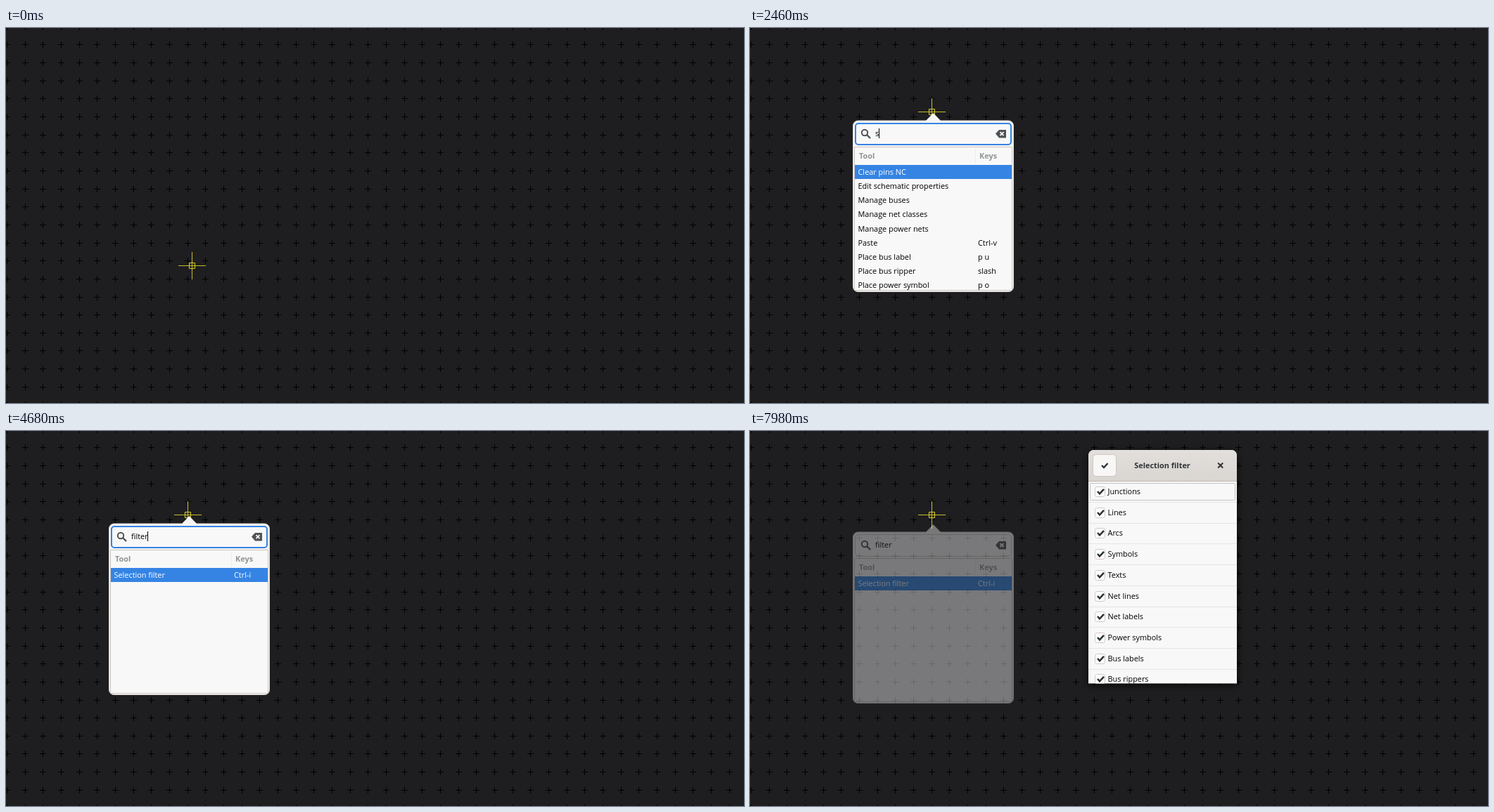
Recreate the animation shown at these times as an HTML page with a canvas. Size 1049x534 px, loop 8 s.

```html
<!DOCTYPE html>
<html lang="en">
<head>
<meta charset="utf-8">
<title>Tool search</title>
<style>
html, body { margin: 0; width: 100%; height: 100%; overflow: hidden; background: #1e1e20; }
canvas { position: absolute; left: 0; top: 0; }
</style>
</head>
<body>
<canvas id="stage" width="1049" height="534"></canvas>
<canvas id="popover" width="1049" height="534"></canvas>
<script>
const LOOP = 8000, TICK = 30;
const BLUE = '#3584e4', PAPER = '#f8f8f8', EDGE = '#cdc7c2', INK = '#000', ICON = '#505355';
const stage = document.getElementById('stage').getContext('2d');
const popCanvas = document.getElementById('popover');
const pop = popCanvas.getContext('2d');

// Rows are "name|keys"
const allTools = ['Annotate', 'BOM export window', 'Clear pins NC', 'Draw arc|d a', 'Draw line|d l',
  'Draw line rectangle|d L', 'Draw net line|n', 'Edit schematic properties', 'Enter datum|Return'];
const sTools = ['Clear pins NC', 'Edit schematic properties', 'Manage buses', 'Manage net classes',
  'Manage power nets', 'Paste|Ctrl-v', 'Place bus label|p u', 'Place bus ripper|slash', 'Place power symbol|p o'];
const fTools = ['Export PDF', 'PDF export window', 'Preferences|Ctrl-P', 'Selection filter|Ctrl-i',
  'Selection qualifier auto|S a', 'Selection qualifier include box|S i',
  'Selection qualifier include origin|S o', 'Selection qualifier touch box|S t'];
const fiTools = fTools.slice(3), filTools = fTools.slice(3, 4);

// Text and distance of its end from the page's right edge
const wideRows = [['Select more', 190], ['Place selected symbols on the board', 21],
  ['Rotate selected symbols', 27], ['Select nets', 190], ['Move to other schematic', 18],
  ['Assign to Group resp. Tag', 4], ['Set group', 190], ['Highlight net connection', 25]];

const typing = [[0, ' ', allTools], [2460, 's', sTools], [3610, '', sTools], [3768, 'f', fTools],
  [4050, 'fi', fiTools], [4200, 'fil', filTools], [4260, 'filt', filTools],
  [4530, 'filte', filTools], [4680, 'filter', filTools]];
const caretOff = [[3210, 3630], [5820, 6210], [6990, LOOP]];
const filters = ['Junctions', 'Lines', 'Arcs', 'Symbols', 'Texts', 'Net lines', 'Net labels',
  'Power symbols', 'Bus labels', 'Bus rippers'];

const unit = (t, start, length) => Math.min(1, Math.max(0, (t - start) / length));
const easeOut = u => 1 - (1 - u) ** 3;

function text(c, s, x, y, color = INK, bold = false, align = 'left') {
  c.font = (bold ? 'bold ' : '') + '10.9px "Open Sans", "Noto Sans", sans-serif';
  c.fillStyle = color;
  c.textAlign = align;
  c.fillText(s, x, y);
}

function rect(c, x, y, w, h, color) {
  c.fillStyle = color;
  c.fillRect(x, y, w, h);
}

function box(c, x, y, w, h, r, fill, stroke, line = 1) {
  c.beginPath();
  c.roundRect(x, y, w, h, r);
  if (fill) { c.fillStyle = fill; c.fill(); }
  if (stroke) { c.strokeStyle = stroke; c.lineWidth = line; c.stroke(); }
}

function path(c, points, color, line) {
  c.beginPath();
  points.forEach(([x, y]) => c.lineTo(x, y));
  c.strokeStyle = c.fillStyle = color;
  c.lineWidth = line;
  if (line) c.stroke(); else c.fill();
}

function cross(c, x, y, r, color, line) {
  path(c, [[x - r, y - r], [x + r, y + r]], color, line);
  path(c, [[x + r, y - r], [x - r, y + r]], color, line);
}

function clip(c, x, y, w, h, draw) {
  c.save();
  c.beginPath();
  c.rect(x, y, w, h);
  c.clip();
  draw();
  c.restore();
}

function drawGrid() {
  rect(stage, 0, 0, 1049, 534, '#1e1e20');
  for (let i = 0; i < 41; i++) {
    for (let j = 0; j < 22; j++) {
      const x = Math.round(1 + 25.67 * i), y = Math.round(-2.4 + 25.66 * j);
      rect(stage, x - 4, y, 9, 1, '#000');
      rect(stage, x, y - 4, 1, 9, '#000');
    }
  }
}

function drawCursor(x, y) {
  const yellow = '#c8bd2a';
  rect(stage, x - 19, y, 39, 1, yellow);
  rect(stage, x, y - 19, 1, 39, yellow);
  box(stage, x - 3.5, y - 3.5, 8, 8, 0, null, '#d8cd2c');
}

function pageFrame(x, w) {
  rect(pop, x, 169, w, 205, PAPER);
  rect(pop, x + 1, 195, w - 2, 20, BLUE);
  box(pop, x + .5, 169.5, w - 1, 204, 0, null, EDGE);
}

function drawTools(x, w, rows) {
  pageFrame(x, w);
  rect(pop, x + 172, 171, 1, 23, '#ededec');
  text(pop, 'Tool', x + 7, 186, '#929595', true);
  text(pop, 'Keys', x + 178, 186, '#929595', true);
  clip(pop, x, 170, w, 203, () => rows.forEach((row, i) => {
    const [name, keys = ''] = row.split('|'), y = Math.round(209 + 20.13 * i);
    text(pop, name, x + 5.5, y, i ? INK : '#fff');
    text(pop, keys, x + 176, y, i ? INK : '#fff');
  }));
}

function drawWide(right) {
  pageFrame(right - 302, 302);
  wideRows.forEach(([s, end], i) =>
    text(pop, s, right - end, Math.round(211 + 20.13 * i), i ? INK : '#fff', false, 'right'));
}

function drawEntry(t, value, left, right) {
  const focus = 1 - easeOut(unit(t, 7365, 200));
  box(pop, left + 1.5, 135.5, right - left - 3, 31, 4.5, PAPER, EDGE);
  pop.globalAlpha = focus;
  box(pop, left + 2, 136, right - left - 4, 30, 4, null, BLUE, 2);
  pop.globalAlpha = 1;

  pop.beginPath();
  pop.arc(left + 15, 149, 4.2, 0, 7);
  pop.strokeStyle = ICON;
  pop.lineWidth = 2;
  pop.stroke();
  path(pop, [[left + 18, 152], [left + 23, 157]], ICON, 2.4);

  const e = right - 9;
  path(pop, [[e - 15, 150.5], [e - 10, 145], [e, 145], [e, 156.5], [e - 10, 156.5]], ICON, 0);
  cross(pop, e - 6, 150.7, 2.5, PAPER, 1.8);

  const x = left + 30;
  if (value === ' ') return rect(pop, x, 144, 3, 14, BLUE);
  text(pop, value, x, 154);
  if (!caretOff.some(([a, b]) => t >= a && t < b))
    rect(pop, Math.round(x + pop.measureText(value).width - .3), 143, 1, 14, INK);
}

function drawPopover(t) {
  const shown = t < 7800 ? easeOut(unit(t, 1063, 150)) : 1 - unit(t, 7855, 150) ** 3;
  popCanvas.style.opacity = shown;
  pop.clearRect(0, 0, 1049, 534);
  if (!shown) return;
  const [, value, rows] = typing.filter(s => t >= s[0]).pop();

  // The wide page slides in from the left, then leaves again
  const back = t >= 3768;
  const wide = back ? 1 - easeOut(unit(t, 3768, 200)) : easeOut(unit(t, 3610, 200));
  const grow = Math.round(38.5 * (back ? 1 - easeOut(unit(t, 3815, 200)) : easeOut(unit(t, 3610, 140))));
  const left = 148 - grow, right = 373 + grow, width = right - left;

  pop.save();
  pop.translate(0, Math.round(20 * (1 - shown) * (t < 7800 ? -1 : 1)));
  box(pop, left - 1.5, 132, width + 3, 243.5, 7, '#f6f5f4', '#dcd8d5');
  path(pop, [[249, 133], [260.5, 121], [272, 133]], '#f6f5f4', 0);
  drawEntry(t, value, left, right);
  clip(pop, left, 169, width, 205, () => {
    const shift = Math.max(width - 225, Math.round(width * wide));
    if (shift) drawWide(left + shift - 3);
    drawTools(left + shift, 225, rows);
  });
  pop.restore();
}

function drawDialog() {
  const c = stage;
  c.save();
  c.shadowColor = 'rgba(0,0,0,.7)';
  c.shadowBlur = 12;
  c.shadowOffsetY = 3;
  box(c, 481, 27, 211, 332.5, [8, 8, 0, 0], PAPER);
  c.restore();
  const shade = c.createLinearGradient(0, 27, 0, 71);
  shade.addColorStop(0, '#e2dfdc');
  shade.addColorStop(1, '#d9d5d1');
  box(c, 481, 27, 211, 44, [8, 8, 0, 0], shade);
  rect(c, 481, 71, 211, 1, '#bfb8b1');
  box(c, 487.5, 33.5, 33, 31, 5, '#f8f7f6', EDGE);
  path(c, [[500, 49], [503, 52], [508.5, 46]], '#2e3436', 2.4);
  text(c, 'Selection filter', 586, 53, '#2e3436', true, 'center');
  cross(c, 668.7, 49, 3.5, '#2e3436', 2);

  clip(c, 481, 72, 211, 287.5, () => filters.forEach((name, i) => {
    const y = Math.round(86 + 29.7 * i);
    box(c, 490.5, y - 6.5, 14, 14, 3, '#fff', EDGE);
    path(c, [[494, y], [497, y + 3.3], [503, y - 3.2]], '#2e3436', 2.6);
    text(c, name, 508.5, y + 4);
    rect(c, 481, y + 15, 211, 1, '#e6e5e4');
  }));
  c.setLineDash([1, 1]);
  box(c, 483.5, 74.5, 206, 24, 2, null, '#8d8f8f');
  c.setLineDash([]);
}

function frame(now) {
  const t = Math.floor(now % LOOP / TICK) * TICK;
  drawGrid();
  if (t < 660) drawCursor(264, 338); else drawCursor(258, 119);
  if (t >= 7920) drawDialog();
  drawPopover(t);
  requestAnimationFrame(frame);
}
requestAnimationFrame(frame);
</script>
</body>
</html>
```
